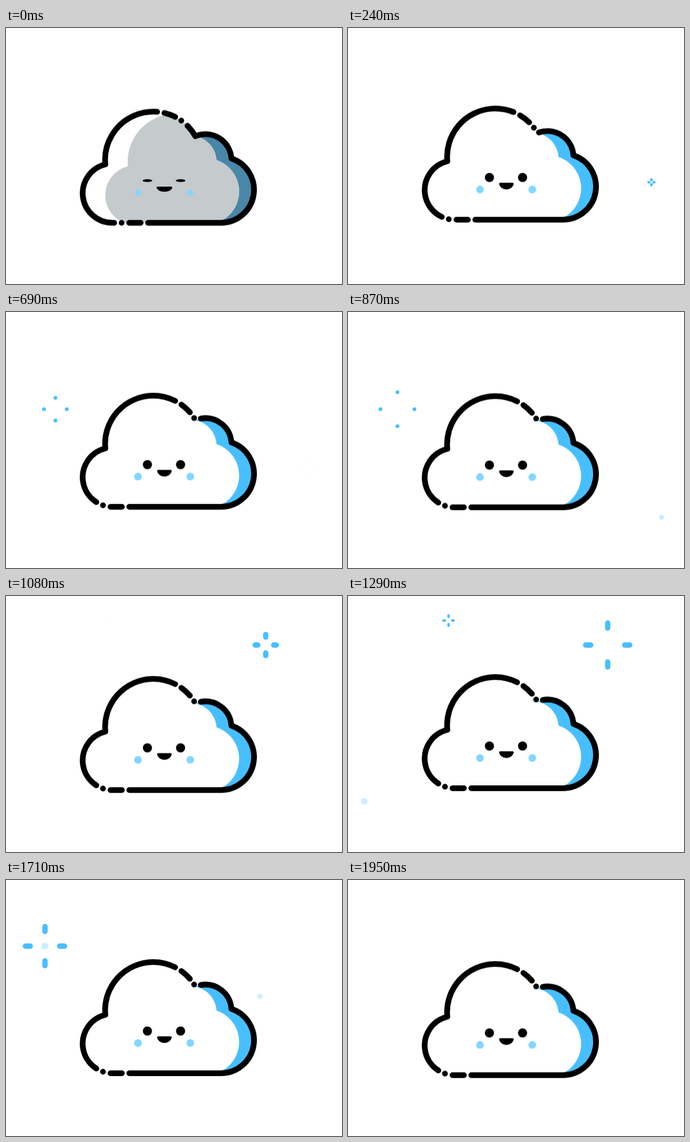
Write an HTML page that moves like this. It is 588 px wide and 449 px high and loops after 1980 ms.

```html
<!DOCTYPE html>
<html lang="en">
<head>
<meta charset="utf-8">
<title>Little cloud</title>
<style>
html, body { margin: 0; width: 100%; height: 100%; overflow: hidden; background: #fff; }
svg { display: block; width: 588px; height: 449px; }

svg * { animation: 1980ms linear infinite; }
.bob { animation-name: bob; }
.outline {
  fill: none; stroke: #000; stroke-width: 10;
  stroke-linecap: round; stroke-linejoin: round;
  stroke-dasharray: 39.4 12.8 20.1 12.5 .01 14.2 399.9 13 20 13.4 .01 12.9 260.1 0;
  animation-name: slide;
}
.shade { fill: #47bfff; animation-name: brighten; }
.storm { fill: #c5cacc; animation-name: clear; }
.eye, .mouth, .cheek { transform-box: fill-box; transform-origin: center; }
.eye { animation-name: wake; }
.mouth { animation-name: smile; }
.cheek { fill: #82d7ff; animation-name: blush; }

/* sparks live for 580 ms of the loop, puffs for 280 ms */
.ray, .bead {
  stroke: #47bfff; stroke-linecap: round; stroke-width: 0;
  stroke-dasharray: .01 300;
}
.ray { animation-name: fly, swell, stretch; }
.bead { animation-name: fly, swell; }
.puff { fill: #47bfff; fill-opacity: .27; transform: scale(0); animation-name: puff; }

@keyframes bob {
  0% { transform: translateY(2.7px); animation-timing-function: cubic-bezier(.3, .29, .64, 1); }
  12.12% { transform: translateY(-2.8px); animation-timing-function: cubic-bezier(.364, 0, .636, 1); }
  42.42% { transform: translateY(3.6px); animation-timing-function: cubic-bezier(.364, 0, .636, 1); }
  72.73% { transform: translateY(-2.8px); animation-timing-function: cubic-bezier(.367, 0, .649, .842); }
  100% { transform: translateY(3.44px); }
}
@keyframes slide {
  0% { stroke-dashoffset: 33px; animation-timing-function: cubic-bezier(.333, .667, .667, 1); }
  22.47%, 100% { stroke-dashoffset: 0px; }
}
@keyframes brighten { 0% { fill: #4a86a8; } 10%, 100% { fill: #47bfff; } }
@keyframes clear { 0% { opacity: 1; } 10%, 100% { opacity: 0; } }
@keyframes wake { 0% { transform: scale(1.04, .31); } 9%, 100% { transform: none; } }
@keyframes smile { 0% { transform: scale(1.08, .78); } 10%, 100% { transform: none; } }
@keyframes blush { 0% { transform: scale(.78); } 10%, 100% { transform: none; } }
@keyframes fly {
  0% { stroke-dashoffset: 0px; }
  29.29%, 100% { stroke-dashoffset: -100px; }
}
@keyframes swell {
  0% { stroke-width: 0px; }
  6%, 27.8% { stroke-width: var(--w); }
  29.29%, 100% { stroke-width: 0px; }
}
@keyframes stretch {
  0% { stroke-dasharray: .01 300; }
  7.32% { stroke-dasharray: 7 300; }
  14.65% { stroke-dasharray: 18.8 300; }
  21.97% { stroke-dasharray: 21 300; }
  26.36% { stroke-dasharray: 10 300; }
  29.29%, 100% { stroke-dasharray: .01 300; }
}
@keyframes puff {
  0% { transform: scale(0); animation-timing-function: cubic-bezier(.39, .575, .565, 1); }
  7.07% { transform: scale(1); animation-timing-function: cubic-bezier(.47, 0, .745, .715); }
  14.14%, 100% { transform: scale(0); }
}
</style>
</head>
<body>
<svg id="stage" viewBox="0 0 588 449">
  <defs>
    <path id="cloud" d="M258 144A84.5 84.5 0 0 1 331.4 187A45.5 45.5 0 0 1 394.4 226A58 58 0 0 1 376 339H186.5A52 52 0 0 1 173.8 236.5A84.5 84.5 0 0 1 258 144"/>
    <clipPath id="inside"><use href="#cloud"/></clipPath>
    <clipPath id="body">
      <use href="#cloud" transform="translate(-26 3)"/>
      <circle cx="258" cy="228.5" r="84.5"/>
    </clipPath>
  </defs>
  <g id="sky"></g>
  <g class="bob">
    <g clip-path="url(#inside)">
      <rect class="shade" x="300" y="160" width="150" height="190"/>
      <g clip-path="url(#body)">
        <rect x="100" y="130" width="350" height="220" fill="#fff"/>
        <g class="storm"><use href="#cloud" transform="translate(39.5 3.5)"/></g>
      </g>
    </g>
    <use class="outline" href="#cloud"/>
    <circle class="eye" cx="247.5" cy="265" r="8"/>
    <circle class="eye" cx="305.5" cy="265" r="8"/>
    <path class="mouth" d="M266.2 274.3H288.2Q290.3 274.4 290 276.6A13 11.3 0 0 1 264.4 276.6Q264.1 274.4 266.2 274.3Z"/>
    <circle class="cheek" cx="231" cy="286" r="6.7"/>
    <circle class="cheek" cx="322.5" cy="286" r="6.7"/>
  </g>
</svg>
<script>
const LOOP = 1980;
const sky = document.getElementById('sky');

function add(parent, tag, attrs) {
  const el = document.createElementNS('http://www.w3.org/2000/svg', tag);
  for (const key in attrs) el.setAttribute(key, attrs[key]);
  return parent.appendChild(el);
}

// A negative delay places each start time inside the shared loop.
const startAt = ms => `animation-delay:${ms - LOOP}ms`;

function spark(kind, x, y, reach, width, start) {
  const g = add(sky, 'g', { transform: `translate(${x} ${y})` });
  for (let turn = 0; turn < 360; turn += 90) {
    add(g, 'line', {
      class: kind, y2: -reach, pathLength: 100,
      transform: `rotate(${turn})`, style: `--w:${width}px;${startAt(start)}`
    });
  }
}

function puff(x, y, start) {
  const g = add(sky, 'g', { transform: `translate(${x} ${y})` });
  add(g, 'circle', { class: 'puff', r: 6.3, style: startAt(start) });
}

spark('ray', 531, 270.5, 17.8, 4.5, 115);
spark('bead', 86.5, 170.5, 31.7, 6.6, 327);
spark('ray', 454.5, 86, 43.5, 9.3, 895);
spark('ray', 176, 43, 17.8, 4.5, 1078);
spark('ray', 68.2, 116, 43.5, 9.3, 1368);

puff(548.5, 360, 800);
puff(28.4, 360, 1190);
puff(68, 116, 1590);
puff(444.5, 204, 1640);
</script>
</body>
</html>
```
